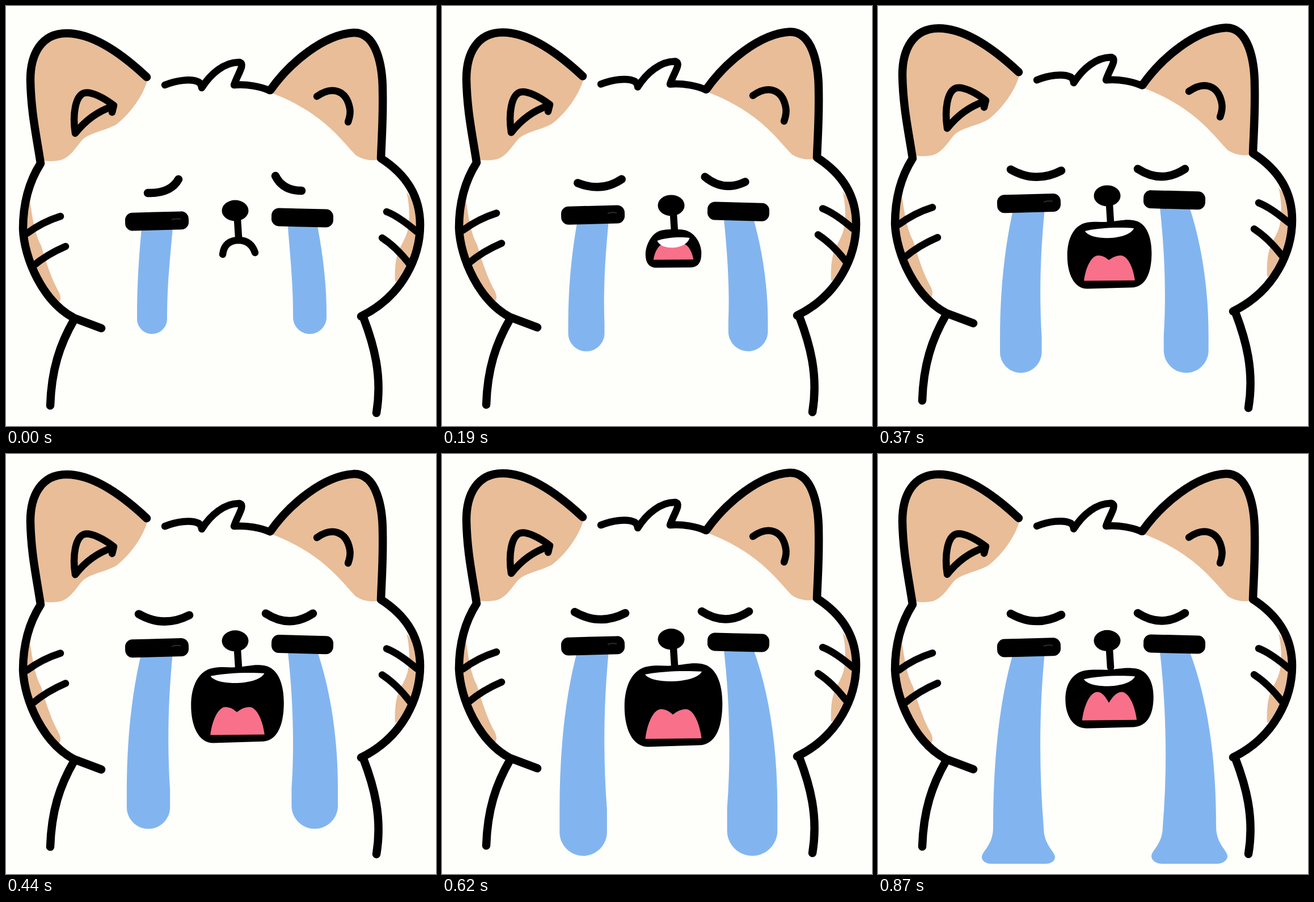
These frames come from a looping animation (758 px wide and 739 px high, 0.94 s). An HTML page:

```html
<!DOCTYPE html>
<html lang="en">
<head>
<meta charset="utf-8">
<title>Crying cat</title>
<style>
  html, body { margin: 0; width: 100%; height: 100%; overflow: hidden; background: #fefefb; }
  svg { display: block; width: 100vw; height: 100vh; }
  .line { fill: none; stroke: #000; stroke-width: 14.5; stroke-linecap: round; stroke-linejoin: round; }
  .thin { stroke-width: 12.5; }
  .tan { fill: #e8bd98; }
  .tear { fill: #82b5ef; }
</style>
</head>
<body>
<svg viewBox="0 0 758 739" xmlns="http://www.w3.org/2000/svg">
  <g id="head">
    <path class="tan" d="M61 277C54 230 44 187 43 130C43 85 62 48 107 48C152 48 201 81 248 125L249 132C240 160 220 188 195 208C175 220 148 222 134 236C122 250 112 269 92 272Q78 274 66 272Z"/>
    <path class="tan" d="M466 148C500 100 560 50 613 47C653 46 664 105 664 150C665 200 662 235 658 270C645 273 629 271 616 262C598 243 578 216 540 190C520 176 495 163 466 152Z"/>
    <path class="tan" d="M42 340C46 370 50 400 62 422C72 455 80 480 94 505Q99 518 92 522C60 490 30 440 30 390Z"/>
    <path class="tan" d="M706 328C712 350 712 380 708 395C700 425 684 425 686 485L700 480C725 440 735 390 724 350Z"/>
    <path class="line" d="M120 552C95 595 80 640 78 703M630 548C648 595 664 650 653 716"/>
    <path class="line" d="M248 125C201 81 152 48 107 48C62 48 43 85 43 130C44 187 54 230 61 277C40 310 30 350 30 392C32 445 65 520 120 549L168 567"/>
    <path class="line" d="M466 148C500 100 560 50 613 47C653 46 664 105 664 150C665 200 662 235 661 268C700 293 730 330 730 385C730 440 700 510 626 546"/>
    <path class="line thin" d="M187 187L190 175C172 161 150 150 138 153C122 158 117 191 122 224C140 201 160 186 187 177"/>
    <path class="line thin" d="M548 159C575 140 600 148 606 180Q608 190 603 204"/>
    <path class="line thin" d="M280 139C300 131 326 127 340 134Q345 138 345 144C360 120 385 98 412 99C422 103 408 120 402 139C425 137 450 142 465 149"/>
  </g>
  <path id="whiskers" class="line thin" d="M37 400Q64 380 96 370M47 458Q72 437 105 423M671 362Q692 370 724 397M663 408Q688 424 712 455"/>
  <path id="tearL" class="tear"/>
  <path id="tearR" class="tear"/>
  <g id="eyes">
    <path id="brows" class="line"/>
    <rect x="210" y="362.5" width="112" height="32" rx="13" transform="rotate(-1.5 266 378)"/>
    <rect x="468" y="356.5" width="109" height="32" rx="13" transform="rotate(1.5 522 372)"/>
    <path d="M292 376Q300 373 308 375" fill="none" stroke="#2c2c2c" stroke-width="2"/>
  </g>
  <g id="nose">
    <ellipse cx="404" cy="360" rx="23.5" ry="18.5"/>
    <path class="line thin" d="M408 376L410 407"/>
    <path id="frown" class="line thin" d="M382 437Q385 412 411 412Q432 413 439 434"/>
    <g id="mouth">
      <path id="lips"/>
      <path id="tongue" fill="#f9708a"/>
      <path id="teeth" fill="#fff" d="M21 20C38 14 62 13 79 15C73 36 28 38 21 20Z"/>
    </g>
  </g>
</svg>
<script>
const $ = id => document.getElementById(id);
const LOOP = 940, STEPS = 15;

const SAD_BROWS = "M250 329Q290 330 304 305M475 299Q488 325 521 325";
const CRY_BROWS = "M234 319Q278 344 323 321M458 318Q500 345 541 318";

// lips inside a box of 100 by 100
const DOME = "M50 0C62 0 68 0 75 4C92 14 100 42 100 62C100 85 95 97 82 99L20 100C5 100 0 85 0 64C0 42 10 12 25 4C34 0 42 0 50 0Z";
const WIDE = "M50 3C62 2 68 -1 79 1C94 4 100 25 100 48C100 75 94 96 78 98L24 100C8 100 0 78 0 52C0 27 8 7 24 4C34 2 42 4 50 3Z";

const mix = (a, b, k) => a + (b - a) * k;
const clamp = v => Math.min(1, Math.max(0, v));
const smooth = v => (v = clamp(v), v * v * (3 - 2 * v));
const setPath = (id, d) => $(id).setAttribute("d", d);
const place = (id, x, y, sx = 1, sy = 1) =>
  $(id).setAttribute("transform", `translate(${x} ${y}) scale(${sx} ${sy})`);

// blends two paths with the same commands
function morph(a, b, k) {
  const goal = b.match(/-?\d+/g);
  let i = 0;
  return a.replace(/-?\d+/g, v => mix(+v, +goal[i++], k).toFixed(2));
}

// the face rises over eight steps, then sinks back a little
function rise(n) {
  const x = clamp(n / 8);
  return x - 1.25 * x * (1 - x) * (.77 - x) - .095 * clamp((n - 8) / 4) ** 2;
}

// a stream from the eye that lengthens, widens and finally splashes
function tear(n, top, outTop, inTop, out, inn) {
  const grow = 1 - (1 - n / 14) ** 1.5;
  const late = Math.max(0, n - 10);
  const dir = Math.sign(inTop - outTop);
  const flare = dir * (2 * late + .75 * late * late);
  const r = Math.abs(inn - out) / 2 - 14 * Math.min(2, late);
  const bottom = Math.min(721, 577 + 9 * n + .4 * n * n);
  const foot = bottom - r * mix(1, .7, clamp(late / 4));
  const waist = foot - 8 - 3.2 * n;
  const at = k => mix(top, waist, k);
  const bend = dir * 9 * grow;
  const o = out - flare, i = inn + flare, c = dir * r;
  const ya = mix(waist, foot, .6), yb = mix(waist, foot, .8), yc = mix(foot, bottom, .55);
  return `M${outTop} ${top}
    C${mix(outTop, out, .55 + .2 * grow)} ${at(.3)} ${out} ${at(.65)} ${out} ${waist}
    C${out} ${ya} ${o} ${yb} ${o} ${foot}
    C${o} ${yc} ${o + c * .45} ${bottom} ${o + c} ${bottom}
    L${i - c} ${bottom}
    C${i - c * .45} ${bottom} ${i} ${yc} ${i} ${foot}
    C${i} ${yb} ${inn} ${ya} ${inn} ${waist}
    C${inn - bend} ${at(.65)} ${mix(inTop, inn, .35) - bend} ${at(.3)} ${inTop} ${top}Z`;
}

function drawMouth(n, up) {
  const open = up > .1;
  $("mouth").style.display = open ? "" : "none";
  $("frown").style.display = open ? "none" : "";
  if (!open) return;
  const close = .33 * smooth((n - 10) / 2.5);
  const gape = (up - .1) / .9 - close;
  const w = 75 + 70 * up + 30 * gape, h = 50 + 100 * gape;
  const left = 408 - w / 2, top = 402 + 18 * close;

  setPath("lips", morph(WIDE, DOME, clamp((.5 - gape) / .3) * (n < 8)));
  place("lips", left, top, w / 100, h / 100);
  place("teeth", left, top, w / 100);

  const tw = 60 + 40 * up, th = 20 + 33 * up;
  const notch = 18 + 60 * close, slope = notch * .6;
  setPath("tongue", `M0 100C3 50 14 0 28 0C38 0 44 ${slope} 49 ${notch}C54 ${slope} 62 0 72 0C86 0 97 50 100 98Z`);
  place("tongue", 408 - tw / 2, top + h - 14 - th, tw / 100, th / 100);
}

function draw(n) {
  const up = rise(n), head = -14.5 * up ** 1.7, eyes = -42 * up;
  place("head", 0, head);
  place("whiskers", 0, head - 8 * Math.sqrt(up));
  place("eyes", 0, eyes);
  place("nose", 0, -35 * up);
  setPath("brows", morph(SAD_BROWS, CRY_BROWS, clamp(n / 4.5)));

  const grow = 1 - (1 - n / 14) ** 1.5, top = 382 + eyes;
  setPath("tearL", tear(n, top, 240, 294.5, 231 - 28 * grow, 284 + 8 * grow));
  setPath("tearR", tear(n, top, 548, 496.5, 565 + 31 * grow, 506 - 4 * grow));
  drawMouth(n, up);
}

// steps run at 16 per second, rounded to 10 ms
const stepStart = n => 10 * Math.ceil(n * 6.25 - .5);
let start = null, shown = 0;

function tick(now) {
  if (start === null) start = now;
  const t = (now - start) % LOOP;
  let n = STEPS - 1;
  while (n > 0 && t < stepStart(n)) n--;
  if (n !== shown) draw(shown = n);
  requestAnimationFrame(tick);
}

draw(0);
requestAnimationFrame(tick);
</script>
</body>
</html>
```
